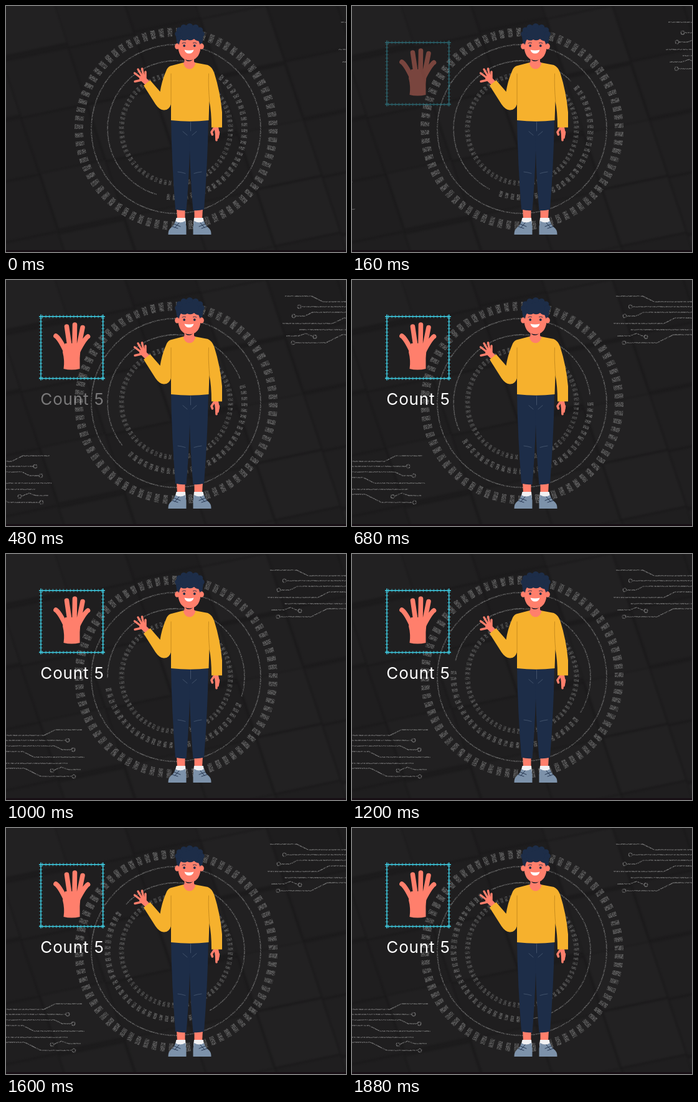
Recreate the animation shown at these times as an HTML page with a canvas. Size 546x396 px, loop 1.92 s.

```html
<!DOCTYPE html>
<html lang="en">
<head>
<meta charset="utf-8">
<title>Count</title>
<style>
html, body { margin: 0; width: 100%; height: 100%; overflow: hidden; background: #201f20; }
canvas, svg { position: absolute; left: 0; top: 0; width: 546px; height: 396px; }
text { font: 400 26px Inter, "Open Sans", sans-serif; letter-spacing: .85px; fill: #fff; }
.skin { fill: #ff7f6c; }
.bone { fill: none; stroke: #ff7f6c; stroke-linecap: round; stroke-linejoin: round; }
.navy { fill: #1d2d48; }
.knit { fill: #f6b12d; }
.line { fill: none; stroke-width: .9; stroke-linecap: round; }
.fold { stroke: #c58a1f; }
.seam { stroke: #46566f; }
.ink { stroke: #1d2d48; }
.shoe { fill: #7d92aa; }
.cyan { fill: none; stroke: #40d5ec; }
</style>
</head>
<body>
<canvas id="stage" width="546" height="396"></canvas>
<svg viewBox="0 0 546 396">
  <g id="palm">
    <path class="cyan" stroke-width="1.4" d="M53 58.700H159M53 158.500H159M56 55.500V161.500M155.700 55.500V161.500"/>
    <path class="cyan" stroke-width="5" stroke-dasharray="1 4.600" opacity=".75" d="M58 58.700H156M58 158.500H156M56 61V158M155.700 61V158"/>
    <path class="skin" d="M95 102H121Q119 116 118.500 126V143Q105 146 92.500 143Q94.500 130 91 116Z"/>
    <path class="bone" stroke-width="7.600" d="M80 90Q86 94 95.500 114M97.500 75L102 106M110.500 72L110 106M123 76.500L117 106M131.500 91Q126 95 116 114"/>
  </g>
  <text id="label" x="55.300" y="201.300">Count 5</text>

  <g id="person">
    <g id="leg">
      <path class="skin" d="M274 326H287.500V343H275Z"/>
      <path fill="#f1f1f3" d="M273.500 341H288L289 351H271Z"/>
      <path class="shoe" d="M272 346Q279 351 288 346L289.500 355V368H260.500Q260 360 266 356Q270 353 272 346Z"/>
      <path class="line ink" d="M270 351L280 355M267 355L276 358M278 349L271 357"/>
      <path class="navy" d="M265 182H295.500V214Q294 280 289.500 329Q281 330 272 327.500Q266 250 265 182Z"/>
      <path class="line seam" d="M276 267Q282 267.500 288 269.500M284 202L291 208"/>
    </g>
    <use href="#leg" transform="matrix(-1 0 0 1 590 0)"/>
    <path class="line seam" d="M296.500 187V201"/>

    <path class="bone" stroke-width="9" d="M218.500 116L226 123"/>
    <path class="bone" stroke-width="3.400" d="M206.500 108L217 116M212 102L219 114M218.500 101L221 113M224 106V117M207 121.500L218 119"/>
    <path class="bone" stroke-width="7" d="M337 193L339.500 205"/>
    <path class="bone" stroke-width="3.600" d="M334 197L330 203L331.500 207M337.500 204L338 216M341.500 203L340 212"/>

    <path class="knit" d="M264 96.500L285 91H303L324 95Q331 98 334.500 108Q344 138 347 171V195.500H330Q330 170 326.500 153L325.500 184Q296 187.500 265 184V158Q262 168 253 167.500Q246 167 240 158L221 128L231.500 119.500L247.500 138Q250 121 257 105Q259 98.500 264 96.500Z"/>
    <path class="line fold" d="M265 109V158M325.500 109Q324.500 128 327 155"/>

    <path class="skin" d="M286.500 80H302V90L304.500 91.500Q302 101.500 294.500 101.500Q287 101 284.500 91.500L286.500 90Z"/>
    <path fill="#24202c" d="M286.500 84H302Q298 89.500 293 89Q289 89 286.500 84Z"/>
    <g id="hair" class="navy"><path d="M272.500 47H317L315 62H275Z"/></g>
    <path class="skin" d="M278 62Q279 56 281 54Q287 57 291 54Q297 57 302 53Q306 57 309 56Q311 59 312.500 68Q310 87 294.500 87.500Q279 87 276.500 68Z"/>
    <g id="eye">
      <ellipse class="skin" cx="274.800" cy="65" rx="3.700" ry="4.700"/>
      <path class="line ink" d="M283 60Q285.500 58.200 288.500 59.500"/>
      <circle class="navy" cx="286.200" cy="64" r="1.900"/>
    </g>
    <use href="#eye" transform="matrix(-1 0 0 1 589 0)"/>
    <path fill="#fff" d="M286.500 70.500Q294 72.500 301.500 70.500Q300 76.500 294 76.500Q288 76.500 286.500 70.500Z"/>
  </g>
</svg>
<script>
const LOOP = 1920, STEP = 40, SPIN = 0.0728;
const W = 546, H = 396, CX = 273, CY = 198, PITCH = 5;
const ctx = document.getElementById('stage').getContext('2d');
const palm = document.getElementById('palm');
const label = document.getElementById('label');
const hair = document.getElementById('hair');

let seed = 7;
const random = () => (seed = (seed * 16807) % 2147483647) / 2147483647;
const clamp = v => Math.min(1, Math.max(0, v));
const rad = deg => deg * Math.PI / 180;

function makeCanvas(w, h) {
  const c = document.createElement('canvas');
  c.width = w;
  c.height = h;
  return c.getContext('2d');
}

// Curly crown: a filled dome edged with small bumps
function addEllipse(cx, cy, rx, ry) {
  const e = document.createElementNS('http://www.w3.org/2000/svg', 'ellipse');
  Object.entries({ cx, cy, rx, ry }).forEach(([k, v]) => e.setAttribute(k, v));
  hair.append(e);
}
addEllipse(295, 45, 21, 14.5);
for (let a = 150; a <= 390; a += 30) {
  addEllipse(295 + 19 * Math.cos(rad(a)), 45 + 12.5 * Math.sin(rad(a)), 4.8, 4.5);
}

// Grain that wears away the grey line work
const grain = makeCanvas(128, 128);
for (let i = 0; i < 128 * 128; i++) {
  grain.fillStyle = `rgba(0,0,0,${random() < .45 ? .75 : .15})`;
  grain.fillRect(i % 128, i >> 7, 1, 1);
}
const layer = makeCanvas(W, H);
const wear = layer.createPattern(grain.canvas, 'repeat');

// Dark floor of slanted blocks at slightly different heights
const floor = makeCanvas(W, H);
floor.fillStyle = '#1c1b1c';
floor.fillRect(0, 0, W, H);
floor.filter = 'blur(1.5px)';
for (let row = -1; row < 6; row++) {
  for (let col = -3; col < 7; col++) {
    const lift = random() * 8;
    const tone = 30 + Math.round(random() * 4);
    floor.setTransform(1, -.21, .33, 1, col * 106 + row * 30 - 34, row * 92 - col * 22 - lift);
    floor.fillStyle = `rgb(${tone},${tone - 1},${tone})`;
    floor.fillRect(0, 0, 103, 88);
  }
}
floor.resetTransform();
floor.filter = 'none';
floor.fillStyle = '#170f14';
floor.fillRect(0, 393, W, 3);

function arc(r, from, to, color, width) {
  layer.strokeStyle = color;
  layer.lineWidth = width;
  layer.beginPath();
  layer.arc(CX, CY, r, rad(from), rad(to));
  layer.stroke();
}

function dashes(r, from, to, color, width) {
  for (let a = from; a < to - .01; a += PITCH) arc(r, a, a + PITCH * .54, color, width);
}

function node(x, y) {
  layer.beginPath();
  layer.arc(x, y, 2.7, 0, 7);
  layer.stroke();
}

// Level run, 1:2 ramp at the bend, level run off the stage
function wire(x, y, bend = 500, rise = 0) {
  layer.beginPath();
  layer.moveTo(x, y);
  layer.lineTo(bend, y);
  layer.lineTo(bend + Math.abs(rise) * 2, y + rise);
  layer.lineTo(660, y + rise);
  layer.stroke();
}

function circuit() {
  layer.strokeStyle = '#7c7c7c';
  layer.lineWidth = 1.4;
  wire(424, 26, 467, 9);
  wire(450, 43);
  wire(441, 58, 456, -6);
  wire(420, 70, 501, -9);
  wire(447, 80);
  wire(440, 101, 490, -13);
  layer.stroke(new Path2D('M426 90H446L457 86L469 91'));
  node(447, 43);
  node(438, 58);
  node(472, 91.5);
  node(437, 101);
}

function placed(dx, dy, flip) {
  layer.save();
  layer.translate(dx, dy);
  layer.scale(flip, 1);
  circuit();
  layer.restore();
}

function draw(t) {
  const turn = t * SPIN;
  layer.globalCompositeOperation = 'source-over';
  layer.clearRect(0, 0, W, H);

  dashes(156, turn, turn + 360, '#626262', 14);
  arc(136, 0, 360, '#666', 1.8);
  arc(110, turn + 106.5, turn + 304, '#666', 1.8);
  dashes(110, turn - 50, turn + 98, '#606060', 9.5);
  dashes(87.5, turn, turn + 360, '#585858', 8);

  placed(Math.max(0, 114 - t * .1875), 0, 1);
  placed(W - Math.max(0, 156 - t * .2165), 257, -1);

  layer.globalCompositeOperation = 'destination-out';
  layer.fillStyle = wear;
  layer.fillRect(0, 0, W, H);

  ctx.drawImage(floor.canvas, 0, 0);
  ctx.drawImage(layer.canvas, 0, 0);
  palm.style.opacity = clamp((t - 80) / 200);
  label.style.opacity = clamp((t - 400) / 200);
}

const start = performance.now();
function tick() {
  const t = (performance.now() - start) % LOOP;
  draw(Math.floor(t / STEP) * STEP);
  requestAnimationFrame(tick);
}
tick();
</script>
</body>
</html>
```
